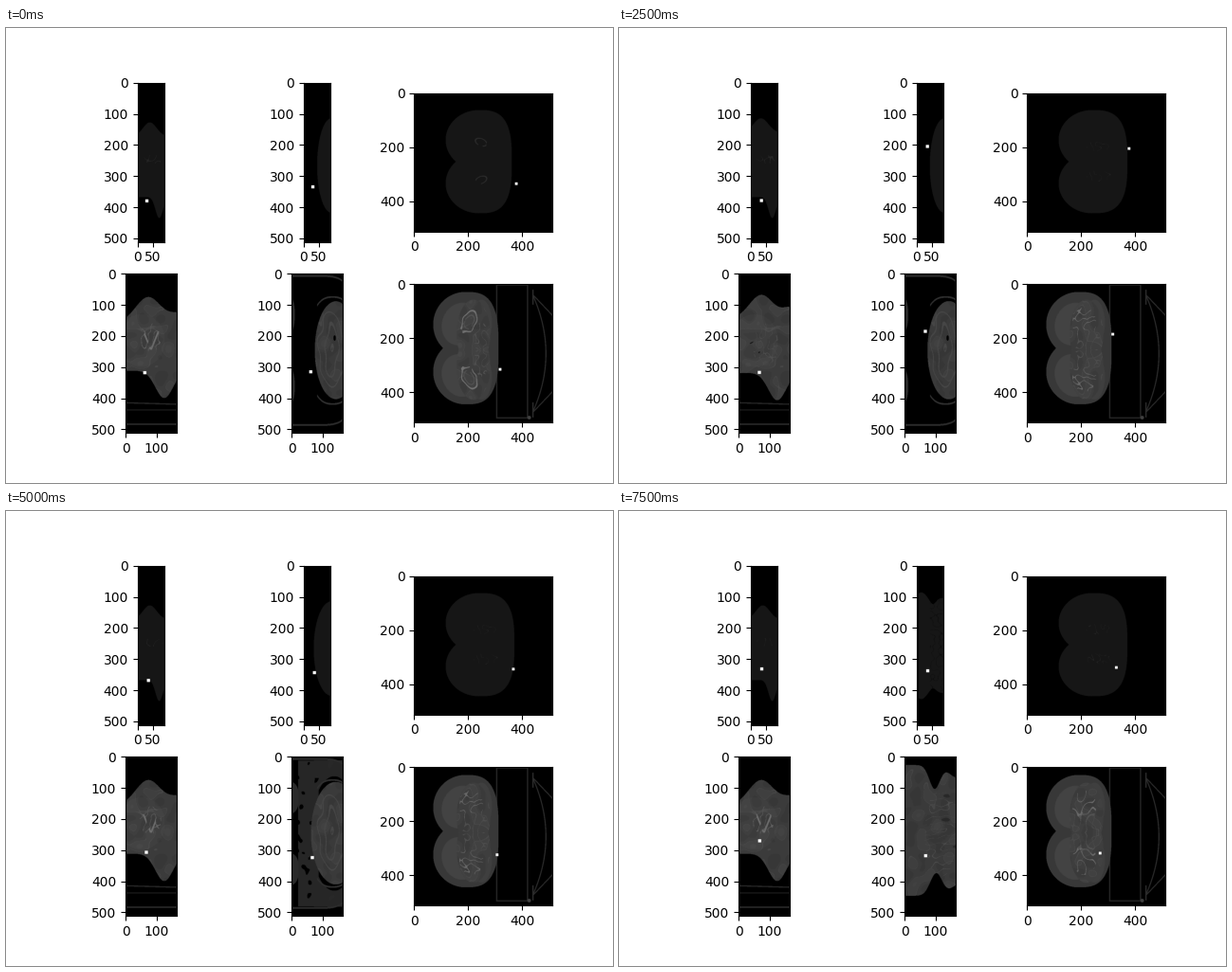
A matplotlib script that plays this animation: 640x480 px, repeating every 8000 ms.

```python
import numpy as np
import matplotlib.pyplot as plt
from matplotlib.animation import FuncAnimation

N = 512
DEPTHS = (88, 165)
SHIFT = np.array([-60, -18, 32])  # offset of the marker in the lower scan

# marker (x, y, z) in the upper scan, one stop per half second
STOPS = np.array([
    (379, 334, 29), (290, 325, 30), (305, 225, 30), (378, 209, 32),
    (290, 228, 32), (378, 204, 34), (288, 222, 34), (288, 318, 32),
    (369, 342, 32), (328, 330, 34), (368, 343, 34), (290, 322, 30),
    (373, 208, 30), (330, 225, 30), (392, 205, 34), (331, 337, 35),
])


def grid(width):
    return np.mgrid[0:N, 0:width].astype(float)


def bump(c, mid, width):
    return np.exp(-((c - mid) / width) ** 2 / 2)


def band(v, low, high):
    return (v > low) & (v < high)


def ellipse(r, c, r0, c0, rr, rc, power=2, tilt=0):
    """Distance measure that is 1 on the (super)ellipse."""
    u, v = r - r0, c - c0
    s, t = np.sin(tilt), np.cos(tilt)
    u, v = (u * t + v * s) / rr, (v * t - u * s) / rc
    return (np.abs(u) ** power + np.abs(v) ** power) ** (1 / power)


def noise(r, c, seed, scale):
    """Smooth field of random waves, roughly in -1..1."""
    rng = np.random.default_rng(seed)
    out = np.zeros_like(r)
    for _ in range(9):
        a, p = rng.uniform(0, 2 * np.pi, 2)
        k = rng.uniform(0.6, 1.8) / scale
        out += np.sin(k * (r * np.sin(a) + c * np.cos(a)) + p)
    return out / 4


def tissue(r, c, seed, base):
    """Flat grey patches with thin lighter borders."""
    f = noise(r, c, seed, 14)
    img = base + 4 * np.clip(np.round(f * 1.3), -1, 2)
    img[np.abs(f - 0.35) < 0.04] = base + 12
    return img


def veins(img, zone, f, width, level):
    img[zone & (np.abs(f) < width)] = level


def dot(img, row, col):
    row, col = int(row), int(col)
    img[row - 5:row + 5, col - 5:col + 5] = 255
    return img


def torso(r, c, mid, half, col, reach, edge):
    """Cross section: two round lobes on the left, a flat right side."""
    lobes = [ellipse(r, c, mid + s * half * 0.42, col, half * 0.58, reach) < 1
             for s in (-1, 1)]
    flat = ellipse(r, c, mid, col, half, edge - col, 3) < 1
    return ((lobes[0] | lobes[1]) & (c <= col)) | (flat & (c > col))


# ---- upper scan: nearly flat dark body ----
def upper_sagittal(x, y, z):
    r, c = grid(DEPTHS[0])
    if y < 270:
        top = 160 - 47 * bump(c, 32, 24)
    else:
        top = 172 - 46 * bump(c, 38, 22)
    body = band(r, top, 366 + 68 * bump(c, 68, 12)) & (c < 84)
    img = np.where(body, 22.0, 0.0)
    zone = ellipse(r, c, 245, 48, 14, 32) < 1
    veins(img, zone & body, noise(r, c, 3 + int(y), 7), 0.06, 38)
    return dot(img, x, z)


def upper_coronal(x, y, z):
    r, c = grid(DEPTHS[0])
    if x > 350:
        body = ellipse(r, c, 265, 88, 152, 46 + 379 - x) < 1
    else:
        swell, waist = bump(c, 14, 14), bump(c, 51, 10)
        grow = (330 - x) * 0.4
        top = 102 - 18 * swell + 20 * waist - grow
        body = band(r, top, 408 + 20 * swell - 15 * waist + grow) & (c > 5)
    body &= c < 84
    img = np.where(body, 22.0, 0.0)
    if x < 350:
        veins(img, body & (c > 42), noise(r, c, x, 6), 0.05, 12)
    return dot(img, y, z)


def upper_axial(x, y, z):
    r, c = grid(N)
    edge = 362 + min(z - 29, 4) * 2.4
    body = torso(r, c, 252, 191, 240, 123, edge)
    img = np.where(body, 22.0, 0.0)
    d = np.abs(r - 250)
    f = noise(r, c, int(z), 7)
    if z < 32:
        ring = ellipse(d, c, 70, 248, 13, 22, tilt=0.4)
        veins(img, f > -0.1, ring - 1, 0.12, 44)
    else:
        zone = ellipse(d, c, 55, 265, 20, 46) < 1
        veins(img, zone & body, f, 0.05, 36)
    return dot(img, y, x)


# ---- lower scan: detailed body on a table ----
def lower_sagittal(x, y, z):
    r, c = grid(DEPTHS[1])
    img = np.zeros_like(r)
    for row, slope, level in ((415, 0.03, 38), (438, 0, 22), (484, 0, 42)):
        img[np.abs(r - row - slope * c) < 2.2] = level

    back = 312 + 88 * bump(c, 122, 28)
    flesh = tissue(r, c + y * 0.3, 21, 59)
    flesh[ellipse(r, c, 215, 50, 85, 75) < 1] += 4
    f = noise(r, c + y, 31, 8)
    if y < 250:
        top = 145 - 77 * bump(c, 72, 38) - 35 * bump(c, 168, 28)
        back = back + 7
        veins(flesh, ellipse(r, c, 230, 85, 70, 40) < 1, f, 0.05, 78)
        flesh[(ellipse(r, c, 245, 65, 30, 42) < 1) & (f > 0.95)] = 14
    else:
        top = 160 - 85 * bump(c, 72, 41) - 30 * bump(c, 172, 30)
        veins(flesh, ellipse(r, c, 205, 78, 45, 34) < 1, f, 0.09, 98)
        vee = np.abs(c - 80) - (245 - r) * 0.4
        veins(flesh, band(r, 185, 245) & (f > -0.3), vee, 3, 108)
    return dot(np.where(band(r, top, back), flesh, img), x, z)


def skin_slice(r, c, x):
    """Slice that grazes the back: table outlines and thin haze."""
    img = np.zeros_like(r)
    d = np.abs(r - 247)
    f = noise(r, c, 41, 7)
    haze = np.clip(309.5 - x, 0, 1)
    if haze:
        img[(c > 70) & band(d, 178, 236)] = 40
        spread = (c > 50 - 30 * haze) & (d < 235)
        img[spread & (f > 2 - 2.8 * haze)] = 24 + 14 * haze
        img[(ellipse(r, c, 247, 135, 184, 75) < 1) & (c > 85)] = 0
    profile = ellipse(r, c, 247, 130, 172, 75, 2.5)
    veins(img, (c > 80) & (d > 125), profile - 1, 0.016, 48)
    veins(img, c >= 0, d - 240 + 20 * (c / 165) ** 8, 3, 44)
    img[ellipse(d, c, 115, 0, 50, 12 + (318 - x) * 1.2) < 1] = 42
    return img


def lower_coronal(x, y, z):
    r, c = grid(DEPTHS[1])
    flesh = tissue(r, c, 44, 58)
    if x > 300:
        img = skin_slice(r, c, x)
        grow = 318 - x
        body = ellipse(r, c, 246, 140, 158 + grow * 0.7, 68 + grow * 1.1) < 1
        q = ellipse(r, c, 245, 128, 165, 58) + 0.1 * noise(r, c, 43, 15)
        veins(flesh, q < 0.95, np.sin(q * 20) - 1, 0.12, 70)
        if grow < 6:
            flesh[ellipse(r, c, 207, 136, 9, 4) < 1] = 0
    else:
        img = np.zeros_like(r)
        grow = (277 - x) * 0.2
        top = 28 + 76 * bump(c, 95, 17) + 40 * bump(c, 165, 25) - grow
        back = 446 - 72 * bump(c, 100, 19) - 36 * bump(c, 172, 25) + grow
        body = band(r, top, back)
        f = noise(r, c, int(x), 8)
        zone = ellipse(r, c, 245, 115, 140, 52) < 1
        veins(flesh, zone, f, 0.05, 76)
        flesh[zone & (f > 1.1)] = 40
    return dot(np.where(body, flesh, img), y, z)


def cradle(r, c):
    """Table box, curved cradle and its braces."""
    img = np.zeros_like(r)
    d = np.abs(r - 257)
    box = np.maximum(np.abs(c - 363) - 57, np.abs(r - 249) - 246)
    img[np.abs(box) < 2.5] = 38
    arc = c - 488 + 48 * (d / 215) ** 2
    veins(img, d < 217, arc, 2.2, 44)
    veins(img, c > 440, d - 217 + (c - 440) * 1.05, 3, 44)
    veins(img, band(d, 180, 237), c - 440, 3, 44)
    img[ellipse(r, c, 494, 426, 7, 7) < 1] = 64
    return img


def lower_axial(x, y, z):
    r, c = grid(N)
    d = np.abs(r - 243)
    flesh = np.full_like(r, 57)
    flesh[ellipse(d, c, 95, 172, 80, 68, tilt=0.35) < 1] = 67
    flesh[ellipse(d, c, 100, 250, 85, 38) < 1] = 63
    core = ellipse(d, c, 60, 220, 125, 62) < 1
    flesh = np.where(core, tissue(d, c, 51 + int(z), 62), flesh)

    f = noise(d + 0.06 * r, c, 60 + int(z), 8)
    if z < 63:
        for size, level in ((1, 112), (0.62, 84)):
            ring = ellipse(d, c, 103, 204, 42 * size, 25 * size, tilt=0.45)
            veins(flesh, f > -0.7, ring + 0.12 * f - 1, 0.08, level)
        veins(flesh, ellipse(d, c, 40, 250, 60, 26) < 1, f, 0.07, 84)
    else:
        veins(flesh, ellipse(d, c, 98, 212, 58, 44) < 1, f, 0.09, 104)
        veins(flesh, ellipse(d, c, 25, 225, 50, 48) < 1, f, 0.06, 78)
    body = torso(r, c, 237, 208, 190, 119, 313)
    return dot(np.where(body, flesh, cradle(r, c)), y, x)


VIEWS = ((upper_sagittal, upper_coronal, upper_axial),
         (lower_sagittal, lower_coronal, lower_axial))

fig, axes = plt.subplots(2, 3, figsize=(6.4, 4.8), dpi=100)
images = [[ax.imshow(np.zeros((N, w)), cmap="gray", vmin=0, vmax=255)
           for ax, w in zip(row, (depth, depth, N))]
          for row, depth in zip(axes, DEPTHS)]


def update(i):
    spots = STOPS[i], STOPS[i] + SHIFT
    for row, views, spot in zip(images, VIEWS, spots):
        for image, view in zip(row, views):
            image.set_data(view(*spot))
    return [image for row in images for image in row]


anim = FuncAnimation(fig, update, frames=len(STOPS), interval=500,
                     repeat=True, repeat_delay=0, blit=False)
plt.show()
```
